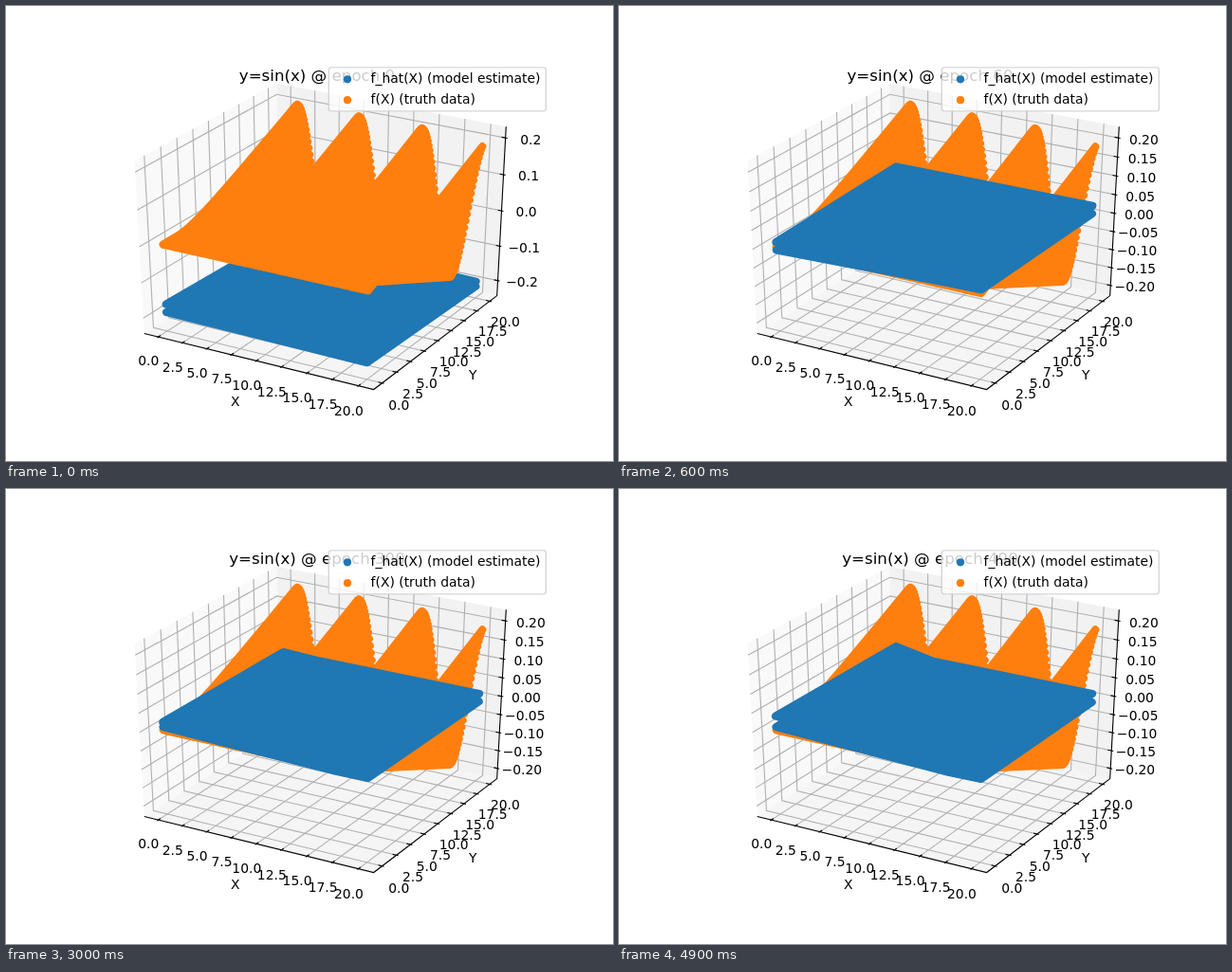
An HTML page for the animation above (5000 ms loop, 640 px wide and 480 px high).

```html
<!DOCTYPE html>
<html lang="en">
<head>
<meta charset="utf-8">
<title>Surface fit</title>
<style>
  html, body { margin: 0; width: 100%; height: 100%; overflow: hidden; background: #fff; }
  svg { display: block; width: 640px; height: 480px; }
  text { font: 13.889px "DejaVu Sans", sans-serif; fill: #000; }
  .mid { text-anchor: middle; }
  #title { font-size: 16.667px; }
  .grid { fill: none; stroke: #b0b0b0; stroke-width: 1.11; }
  .axis { fill: none; stroke: #000; stroke-width: 1.11; }
  .truth { fill: none; stroke: #ff7f0e; }
  .model { fill: #1f77b4; stroke: #1f77b4; }
  .truth, .model { stroke-width: 8.2; stroke-linecap: round; stroke-linejoin: round; }
</style>
</head>
<body>
<svg viewBox="0 0 640 480">
  <g id="frame"></g>
  <g id="data"></g>
  <text id="title" class="mid" x="328" y="79"></text>
  <rect x="340.3" y="64.9" width="229" height="46" rx="2.8" fill="#fff" fill-opacity=".8" stroke="#ccc" stroke-opacity=".8" stroke-width="1.39"/>
  <circle cx="360" cy="77.3" r="4.1" fill="#1f77b4"/>
  <circle cx="360" cy="99.2" r="4.1" fill="#ff7f0e"/>
  <text x="384.6" y="81.2">f_hat(X) (model estimate)</text>
  <text x="384.6" y="102.6">f(X) (truth data)</text>
</svg>
<script>
const STEP = 100, STEPS = 50;
const EDGE = 25 / 48;          // half size of the box, in units of the axis range
const TICK_PAD = 0.0738, LABEL_PAD = 0.1605;
const el = id => document.getElementById(id);

// Perspective view: elevation 30, azimuth -60, distance 10
const S3 = Math.sqrt(3) / 2;
function project(x, y, z) {
  const w = 10 - (S3 / 2 * x - 0.75 * y + z / 2);
  const right = S3 * x + y / 2;
  const up = -x / 4 + S3 / 2 * y + S3 * z;
  return [334.7 + 2681.08 * right / w, 237.4 - 1997.84 * up / w];
}
const path = pts => 'M' + pts.map(p => project(...p).map(v => v.toFixed(2)).join(' ')).join('L');
const line = (cls, ...pts) => `<path class="${cls}" d="${path(pts)}"/>`;
const pane = (fill, ...pts) => `<path fill="${fill}" d="${path(pts)}Z"/>`;
function label(text, pos, drop) {
  const [x, y] = project(...pos);
  return `<text class="mid" x="${x.toFixed(2)}" y="${(y + drop).toFixed(2)}">${text}</text>`;
}

const flat = v => (v + 1) / 22 - 0.5;
const heightScale = ([lo, hi]) => z => (z - lo) / (hi - lo) - 0.5;

function drawFrame(lim, zStep, digits) {
  const E = EDGE, out = E + 0.0083, inn = E - 0.0167, far = E + TICK_PAD;
  const zs = heightScale(lim);
  let grid = '', ticks = '', text = '';
  for (let v = 0; v <= 20; v += 2.5) {
    const p = flat(v);
    grid += line('grid', [p, -E, -E], [p, E, -E], [p, E, E]);
    grid += line('grid', [E, p, -E], [-E, p, -E], [-E, p, E]);
    ticks += line('axis', [p, -out, -E], [p, -inn, -E]);
    ticks += line('axis', [out, p, -E], [inn, p, -E]);
    text += label(v.toFixed(1), [p, -far, -far], 10.9);
    text += label(v.toFixed(1), [far, p, -far], 10.9);
  }
  const n = Math.round(0.2 / zStep);
  for (let i = -n; i <= n; i++) {
    const p = zs(i * zStep);
    grid += line('grid', [-E, -E, p], [-E, E, p], [E, E, p]);
    ticks += line('axis', [out, E, p], [inn, E, p]);
    text += label((i < 0 ? '\u2212' : '') + Math.abs(i * zStep).toFixed(digits), [far, far, p], 9);
  }
  const name = EDGE + LABEL_PAD;
  return pane('#f9f9f9', [-E, -E, -E], [-E, E, -E], [-E, E, E], [-E, -E, E]) +
    pane('#f2f2f2', [-E, E, -E], [E, E, -E], [E, E, E], [-E, E, E]) +
    pane('#f5f5f5', [-E, -E, -E], [E, -E, -E], [E, E, -E], [-E, E, -E]) +
    grid + line('axis', [-E, -E, -E], [E, -E, -E], [E, E, -E], [E, E, E]) + ticks + text +
    label('X', [0, -name, -name], 5) + label('Y', [name, 0, -name], 5);
}

// z = y sin(x) / 100: straight in y, so one stroke per x
function drawTruth(lim) {
  const zs = heightScale(lim);
  let d = '';
  for (let i = 0; i <= 200; i++) {
    const x = i / 10;
    d += path([[flat(x), flat(0), zs(0)], [flat(x), flat(20), zs(Math.sin(x) / 5)]]);
  }
  return `<path class="truth" d="${d}"/>`;
}

// step, then heights: left (upper, lower), front (upper, lower),
// right (upper, lower), back, bend in the back edge, bend in the front edge
const KEYS = [
  [0, -.167, -.19, -.185, -.197, -.196, -.21, -.185, -.187, -.196],
  [2, .023, -.015, .035, -.007, .083, .026, .081, .081, -.008],
  [6, .0133, -.008, .02, .009, .026, .005, .024, .024, .007],
  [14, .011, .003, .008, 0, .008, 0, .007, .007, 0],
  [30, .021, .008, .008, -.005, .013, -.008, .017, .013, -.006],
  [40, .026, .006, .008, -.006, .013, -.009, .024, .012, -.009],
  [49, .037, .008, .008, -.0075, .013, -.01, .033, .0126, -.009]
];
function heightsAt(step) {
  let i = 0;
  while (i < KEYS.length - 2 && KEYS[i + 1][0] <= step) i++;
  const a = KEYS[i], b = KEYS[i + 1], f = (step - a[0]) / (b[0] - a[0]);
  return a.map((v, k) => v + (b[k] - v) * f).slice(1);
}
function drawModel(h, lim) {
  const zs = heightScale(lim);
  const [left, left2, front, front2, right, right2, back, backBend, frontBend] = h;
  const sheet = pts => `<path class="model" d="${path(pts.map(([x, y, z]) => [flat(x), flat(y), zs(z)]))}Z"/>`;
  return sheet([[0, 0, left2], [17, 0, frontBend], [20, 0, front2], [20, 20, right2], [0, 20, back - right + right2]]) +
    sheet([[0, 0, left], [0, 20, back], [3.9, 20, backBend], [20, 20, right], [20, 0, front]]);
}

const SCENES = [
  { lim: [-.2347, .2207], zStep: .1, digits: 1 },
  { lim: [-.22, .22], zStep: .05, digits: 2 }
];
for (const s of SCENES) {
  s.frame = drawFrame(s.lim, s.zStep, s.digits);
  s.truth = drawTruth(s.lim);
}

let shownStep = -1, shownScene = null;
function render(ms) {
  const step = Math.floor(ms / STEP) % STEPS;
  if (step === shownStep) return;
  shownStep = step;
  const scene = SCENES[step ? 1 : 0];
  if (scene !== shownScene) {
    shownScene = scene;
    el('frame').innerHTML = scene.frame;
  }
  const h = heightsAt(step), model = drawModel(h, scene.lim);
  // the set with the nearest front corner is painted last
  el('data').innerHTML = h[2] < 0 ? model + scene.truth : scene.truth + model;
  el('title').textContent = `y=sin(x) @ epoch ${step * 10}`;
}

const start = performance.now();
function tick() {
  render(performance.now() - start);
  requestAnimationFrame(tick);
}
tick();
</script>
</body>
</html>
```
